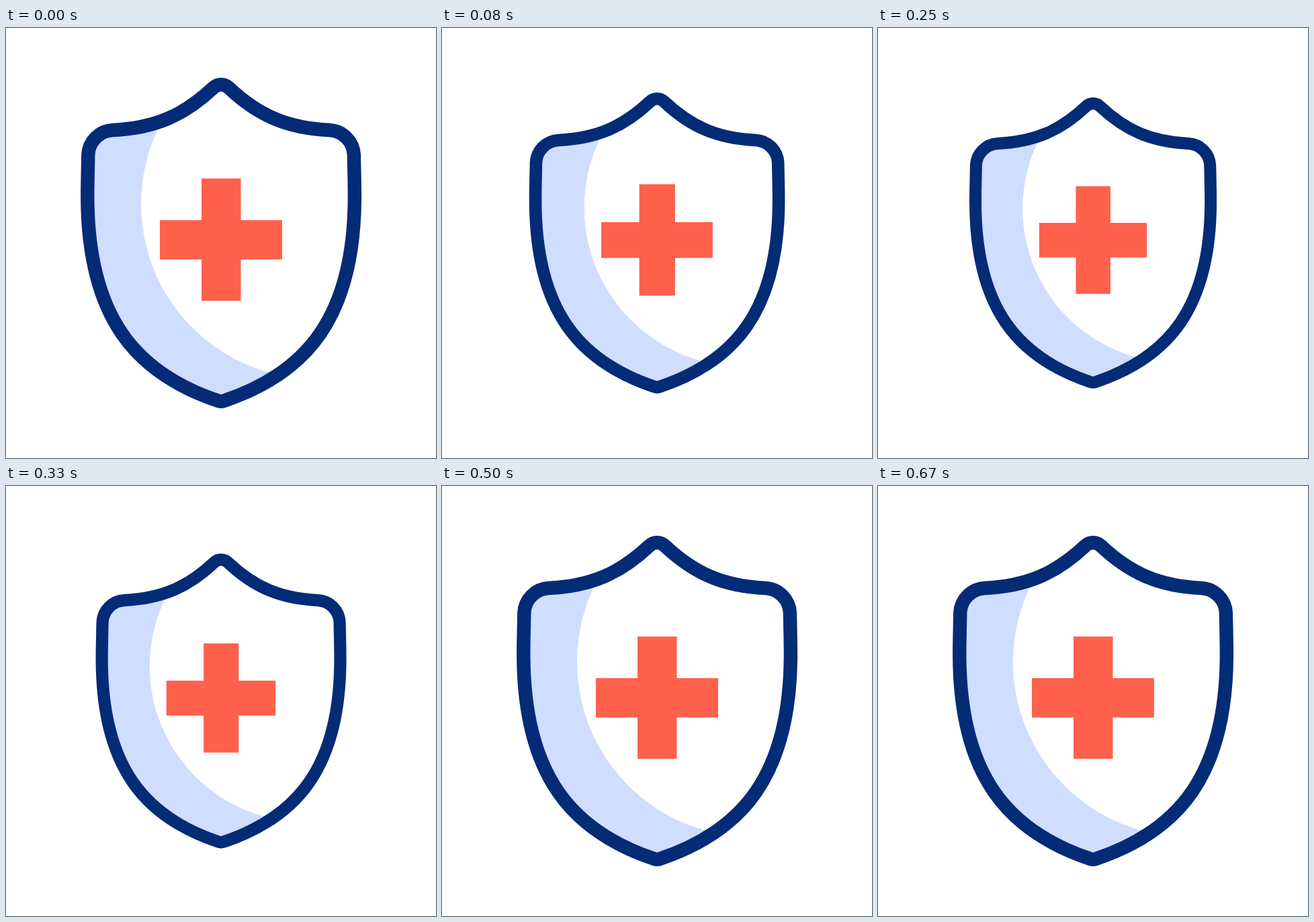
Write an HTML page that moves like this. It is 640x640 px and loops after 1540 ms.

```html
<!DOCTYPE html>
<html lang="en">
<head>
<meta charset="utf-8">
<title>Shield pulse</title>
<style>
  html, body { margin: 0; width: 100%; height: 100%; overflow: hidden; background: #fff; }
  svg { display: block; width: 100%; height: 100%; }
</style>
</head>
<body>
<svg viewBox="0 0 640 640">
  <defs>
    <path id="outline" d="M308.5 89C265 130 222 149 159 152C139 153 123 169 122.3 189
      C122 209 121.3 230 121.3 250C121.3 430 192.5 513.5 316 555Q320.1 556.4 324.2 555
      C447.7 513.5 518.9 430 518.9 250C518.9 230 518.2 209 517.9 189
      C517.2 169 501.2 153 481.2 152C418.2 149 375.2 130 331.7 89C325.2 82.6 315 82.6 308.5 89Z"/>
  </defs>
  <g id="shield">
    <use href="#outline" fill="#cfddff"/>
    <circle cx="461" cy="262" r="260" fill="#fff"/>
    <path d="M291 224h58.5v62h61.5v58.5h-61.5v61.5h-58.5v-61.5h-62v-58.5h62z" fill="#ff614d"/>
    <use href="#outline" fill="none" stroke="#042b76" stroke-width="20.4" stroke-linejoin="round"/>
  </g>
</svg>
<script>
const LOOP = 1540, FRAME = 1000 / 24, POWER = 2.67;
const shield = document.getElementById("shield");

// Rises to 1 at "low": quick start, soft turn, quick finish.
function dip(f, start, low, end) {
  if (f <= start || f >= end) return 0;
  const away = f < low ? (low - f) / (low - start) : (f - low) / (end - low);
  return 1 - away ** POWER;
}

function draw(now) {
  // 24 steps per second, on a 10 ms clock
  const t = Math.floor((now % LOOP) / 10) * 10;
  const f = Math.floor((t + 4.9) / FRAME);
  const s = 1 - 0.12 * dip(f, 0, 5, 12) - 0.0505 * dip(f, 12, 14, 16);
  shield.setAttribute("transform", `translate(320 320) scale(${s}) translate(-320 -320)`);
}

const begin = performance.now();
function tick() {
  draw(performance.now() - begin);
  requestAnimationFrame(tick);
}
tick();
</script>
</body>
</html>
```
